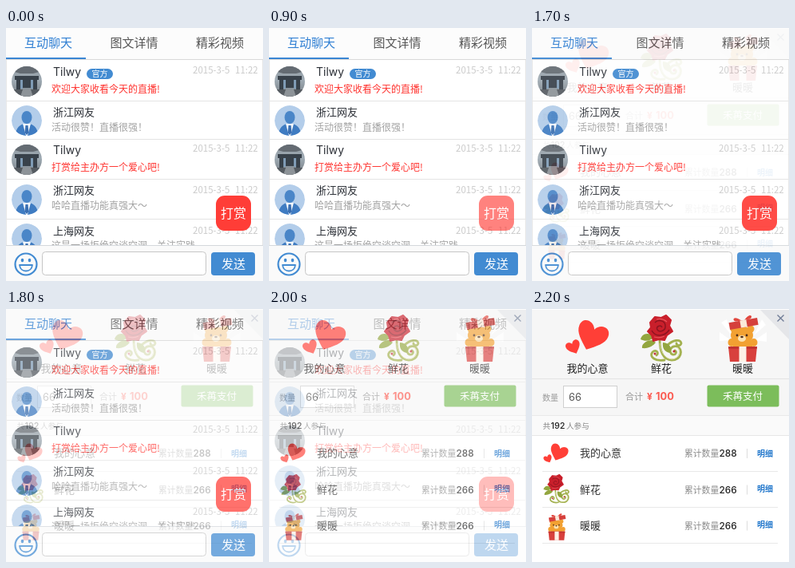
An HTML page that plays this animation: 322x317 px, repeating every 4500 ms.

```html
<!DOCTYPE html>
<html lang="zh-CN">
<head>
<meta charset="utf-8">
<title>互动聊天</title>
<style>
html, body { margin: 0; width: 100%; height: 100%; overflow: hidden; background: #fff; }
svg { display: block; width: 100%; height: 100%; }
text { font-family: "Noto Sans CJK SC", "Noto Sans CJK", sans-serif; white-space: pre; }
.num { font-family: Inter, "Noto Sans CJK SC", sans-serif; }
</style>
</head>
<body>
<svg viewBox="0 0 322 317">
  <defs>
    <clipPath id="round"><circle r="19"/></clipPath>
    <clipPath id="list"><rect y="40" width="322" height="232"/></clipPath>
    <linearGradient id="sky" x2="0" y2="1">
      <stop offset="0" stop-color="#8f989f"/>
      <stop offset=".45" stop-color="#9fabb4"/>
      <stop offset="1" stop-color="#747b81"/>
    </linearGradient>

    <g id="hall" clip-path="url(#round)">
      <rect x="-19" y="-19" width="38" height="38" fill="url(#sky)"/>
      <path d="M-19 -19H19V-13L8 -10H-8L-19 -13Z" fill="#646b72"/>
      <path d="M-15 -7H15V-2H-15ZM-13 -2H-8V11H-13ZM8 -2H13V11H8ZM-5 -2H5V8H-5Z" fill="#38414a"/>
      <path d="M-8 -2H-5V9H-8ZM5 -2H8V9H5Z" fill="#7f9bb5"/>
      <path d="M-19 10H19V19H-19Z" fill="#555b61"/>
      <path d="M-5 10H5L8 19H-8Z" fill="#8d9398"/>
    </g>

    <g id="guest" clip-path="url(#round)">
      <circle r="19" fill="#b3cdea"/>
      <path d="M-14 19C-14 9 -9 6 -4 4H4C9 6 14 9 14 19Z" fill="#3f7cc2"/>
      <path d="M-5 4H5L1 19H-1Z" fill="#f4f8fc"/>
      <path d="M-1.5 6H1.5L2.5 15L0 18L-2.5 15Z" fill="#3a6fb2"/>
      <ellipse cy="-4" rx="6.5" ry="8" fill="#4a86c8"/>
    </g>

    <path id="heart" d="M0 18C-10 9 -18 3 -18 -6C-18 -18 -4 -18 0 -8C4 -18 18 -18 18 -6C18 3 10 9 0 18Z"/>
    <g id="hearts" fill="#ff3f37">
      <use href="#heart" transform="translate(5 -2.5) rotate(22) scale(1.08 1.04)"/>
      <use href="#heart" transform="translate(-18 11.5) rotate(-24) scale(.5)"/>
    </g>

    <g id="rose">
      <g fill="none" stroke="#a3b14f" stroke-width="2.8" stroke-linecap="round">
        <path d="M-2 2C-2 15 2 27 13 27C25 27 28 14 20 10C12 8 8 17 14 20C18 21 20 17 17 15"/>
        <path d="M4 27C-7 29 -16 23 -11 17C-7 13 -2 18 -6 21"/>
        <path d="M8 8C14 2 24 0 25 6C24 10 19 9 19 6"/>
      </g>
      <path d="M-2 6C-1 16 4 25 13 26C22 26 25 15 20 11" fill="none" stroke="#d9dda4" stroke-width=".9"/>
      <path d="M-13 -5C-20 -8 -25 -4 -26 1C-20 4 -14 3 -10 -1ZM-11 2C-19 2 -25 7 -24 12C-16 13 -10 9 -7 5ZM2 5C11 6 14 12 11 18C4 17 1 12 2 5Z" fill="#93a63f"/>
      <path d="M-14 -20L-8 -27L0 -26L6 -29L12 -23L10 -16L14 -9L7 -4L4 2L-3 1L-10 3L-12 -4L-17 -9L-13 -14Z" fill="#c91f2b" stroke="#c91f2b" stroke-width="2" stroke-linejoin="round"/>
      <path d="M-8 -20C-4 -25 5 -22 5 -16C6 -10 -2 -7 -5 -11C-7 -15 -1 -18 1 -14M-12 -10C-7 -1 5 -3 10 -11" fill="none" stroke="#8c1520" stroke-width="1.5"/>
      <path d="M-6 -24Q1 -26 7 -21M-9 -2Q-2 0 4 -3" fill="none" stroke="#e9545a" stroke-width="1.2"/>
      <g fill="#c3313a"><circle cx="16" cy="16" r="1.6"/><circle cx="-8" cy="19" r="1.5"/></g>
    </g>

    <g id="gift">
      <path d="M-14 -4L-27 -20L-20 -24ZM-15 2L-29 -8L-29 3ZM14 -4L24 -24L29 -17ZM15 2L30 -8L30 4Z" fill="#fff"/>
      <g fill="#f2a132">
        <circle cx="-11" cy="-12" r="4.5"/><circle cx="10" cy="-12" r="4.5"/>
        <ellipse cy="7" rx="13" ry="8"/>
        <ellipse cx="-14" cy="5" rx="4.5" ry="5"/><ellipse cx="14" cy="5" rx="4.5" ry="5"/>
        <ellipse cx="-1" cy="-4" rx="14" ry="11"/>
      </g>
      <g transform="translate(1 -19) rotate(-10)">
        <path d="M-2 -4C-11 -13 -14 -6 -9 -4ZM2 -4C11 -13 14 -6 9 -4Z" fill="#e2483f"/>
        <path d="M-18 -4H18V5H-18Z" fill="#d5403c"/>
        <path d="M-4 -4H4V5H-4Z" fill="#fbe9d8"/>
      </g>
      <ellipse cx="-1" cy="0" rx="5" ry="4" fill="#fce2b0"/>
      <g fill="#4d2a18"><circle cx="-7" cy="-4" r="1.4"/><circle cx="5" cy="-4" r="1.4"/><ellipse cx="-1" cy="-2" rx="1.8" ry="1.3"/></g>
      <path d="M-18 10H18L16 29H-16Z" fill="#d8403d"/>
      <path d="M-18 10H18L17.6 13H-17.6Z" fill="#c23331"/>
      <path d="M-4.5 10H4.5V29H-4.5Z" fill="#fdf1e6"/>
    </g>
  </defs>
  <g id="chat"></g>
  <g id="tip"></g>
  <g id="shop"></g>
</svg>
<script>
const LOOP = 4500;
const $ = id => document.getElementById(id);

const text = (x, y, size, fill, str, extra = '') =>
  `<text x="${x}" y="${y}" font-size="${size}" fill="${fill}" ${extra}>${str}</text>`;
const mid = (x, y, size, fill, str, extra = '') =>
  text(x, y, size, fill, str, `text-anchor="middle" ${extra}`);
const num = (x, y, size, fill, str, weight = 500) =>
  text(x, y, size, fill, str, `class="num" font-weight="${weight}"`);
const medium = 'font-weight="500"';
const box = (x, y, w, h, fill, r = 0, extra = '') =>
  `<rect x="${x}" y="${y}" width="${w}" height="${h}" rx="${r}" fill="${fill}" ${extra}/>`;
const rule = (x, y, w, fill = '#e4e4e4') => box(x, y, w, 1, fill);
const icon = (id, x, y, k = 1) => `<use href="#${id}" transform="translate(${x} ${y}) scale(${k})"/>`;

// Chat view
const host = 'Tilwy', red = '#ff3430', gray = '#a2a2a2';
const posts = [
  // avatar, centre, name, name y, words, words y, date y, colour, rule y
  ['hall', 67, host, 60, '欢迎大家收看今天的直播!', 81.3, 57, red, 91],
  ['guest', 116, '浙江网友', 110, '活动很赞！直播很强！', 128.5, 0, gray, 139],
  ['hall', 165, host, 158, '打赏给主办方一个爱心吧!', 179, 155, red, 189],
  ['guest', 215, '浙江网友', 208, '哈哈直播功能真强大～', 226.5, 207, gray, 239],
  ['guest', 264, '上海网友', 259, '这是一场拒绝空谈空洞，关注实践', 276.5, 258, gray, 290]
];
const date = y => text(234, y, 11.5, '#cbcbcb', '2015-3-5') + text(287, y, 11.5, '#cbcbcb', '11:22');
const post = ([pic, cy, name, ny, words, wy, dy, color, end]) =>
  icon(pic, 26, cy) +
  (name === host ? num(59, ny, 14, '#2b2f36', name, 400) : text(59, ny, 13, '#2b2f36', name)) +
  text(57, wy, 12, color, words) +
  (dy ? date(dy) : '') +
  rule(1, end, 320);

$('chat').innerHTML =
  box(0, 0, 322, 317, '#fff') + box(0, 0, 322, 39, '#fcfcfc') +
  mid(53, 24.3, 15, '#2f7fd3', '互动聊天') +
  mid(160.5, 24.3, 15, '#555', '图文详情') +
  mid(268, 24.3, 15, '#555', '精彩视频') +
  rule(0, 39, 322, '#d9d9d9') + box(0, 37, 100, 2, '#3a86d4') +
  `<g clip-path="url(#list)">${posts.map(post).join('')}</g>` +
  box(101, 51, 33, 13, '#428bd2', 6.5) + mid(117.5, 61.2, 10, '#fff', '官方', medium) +
  box(0, 40, 1, 232, '#e8e8e8') + box(321, 40, 1, 232, '#e8e8e8') +
  box(0, 272, 322, 45, '#fafafa') + rule(0, 272, 322, '#d4d8dc') +
  `<g fill="none" stroke="#428bd2" stroke-width="2.2" stroke-linejoin="round">
     <circle cx="25" cy="296" r="13.5"/><path d="M17 297H33C32 307 18 307 17 297Z" stroke-width="1.8"/></g>
   <g fill="#428bd2"><ellipse cx="20.5" cy="291" rx="1.8" ry="2.2"/><ellipse cx="29.5" cy="291" rx="1.8" ry="2.2"/></g>` +
  box(45.5, 280.5, 205, 29, '#fff', 4, 'stroke="#c6c6c6"') +
  box(257, 281, 55, 29, '#428bd2', 4) + mid(285, 301, 15, '#fff', '发送', medium);

$('tip').innerHTML =
  box(263, 210, 44, 44, '#ff3d37', 11) + mid(285, 238, 16, '#fff', '打赏');

// Gift view
const gifts = [
  // icon, name, label centre, top x/y, row x/y, scale, row base, count
  ['hearts', '我的心意', 69.5, 70, 36, 30.5, 181, .575, 185, 288],
  ['rose', '鲜花', 162, 162, 37, 30.5, 225.5, .62, 230.5, 266],
  ['gift', '暖暖', 264, 264, 37, 31, 273, .58, 275.5, 266]
];
const gift = ([id, name, lx, x, y, rx, ry, k, base, count], i) =>
  icon(id, x, y) + mid(lx, 79, 13, '#222', name) +
  icon(id, rx, ry, k) + text(60, base + .4, 13, '#333', name) +
  text(191, base, 10.8, '#8a8a8a', '累计数量') +
  num(234.5, base, 11.8, '#222', count) +
  box(269, base - 10, 1, 12, '#ddd') +
  text(282, base - (i ? 1.4 : .4), 10, '#2378cc', '明细', 'font-weight="700"') +
  rule(13, 203 + 45 * i, 295, '#e8e8e8');

$('shop').innerHTML =
  box(0, 0, 322, 317, '#fff') + box(0, 1, 322, 132, '#f6f6f6') +
  '<path d="M286 1H322V38Z" fill="#e5e6e9"/>' +
  '<path d="M307.5 7.5L315.5 15.5M315.5 7.5L307.5 15.5" stroke="#6d7a94" stroke-width="1.3"/>' +
  rule(0, 87, 322, '#e3e3e3') +
  box(0, 133, 322, 25, '#fafafa') + rule(0, 133, 322, '#e9e9e9') + rule(0, 158, 322, '#e6e6e6') +
  text(13, 114.6, 10, '#999', '数量', medium) +
  box(39.5, 96.5, 67, 27, '#fff', 0, 'stroke="#cfcfcf"') +
  num(46, 115, 12.8, '#555', '66', 400) +
  text(117, 114, 11, '#999', '合计') +
  num(144, 114, 12, '#fb5a50', '¥', 700) + num(155, 114, 12.8, '#fb5a50', '100', 700) +
  box(219.5, 95.5, 90, 27, '#7cbd5b', 2) + mid(264, 113.5, 12.5, '#fff', '禾苒支付') +
  text(13.5, 149.8, 9.6, '#888', '共') + num(23.5, 149.8, 10.8, '#222', '192') +
  text(43, 149.8, 9.6, '#888', '人参与') +
  gifts.map(gift).join('');

// Each step holds its opacity until the next one
function steps(el, table) {
  const frames = table.map(([ms, opacity]) => ({ offset: ms / LOOP, opacity, easing: 'step-end' }));
  frames.push({ offset: 1, opacity: table[table.length - 1][1] });
  el.animate(frames, { duration: LOOP, iterations: Infinity }).startTime = start;
}
const run = (from, values) => values.map((v, i) => [from + 100 * i, v]);

const start = document.timeline.currentTime || 0;
steps($('tip'), [[0, 1], ...run(700, [.88, .76, .64, .76, .88, 1])]);
steps($('shop'), [[0, 0], ...run(1700, [.08, .27, .47, .66, .84, 1])]);
</script>
</body>
</html>
```
